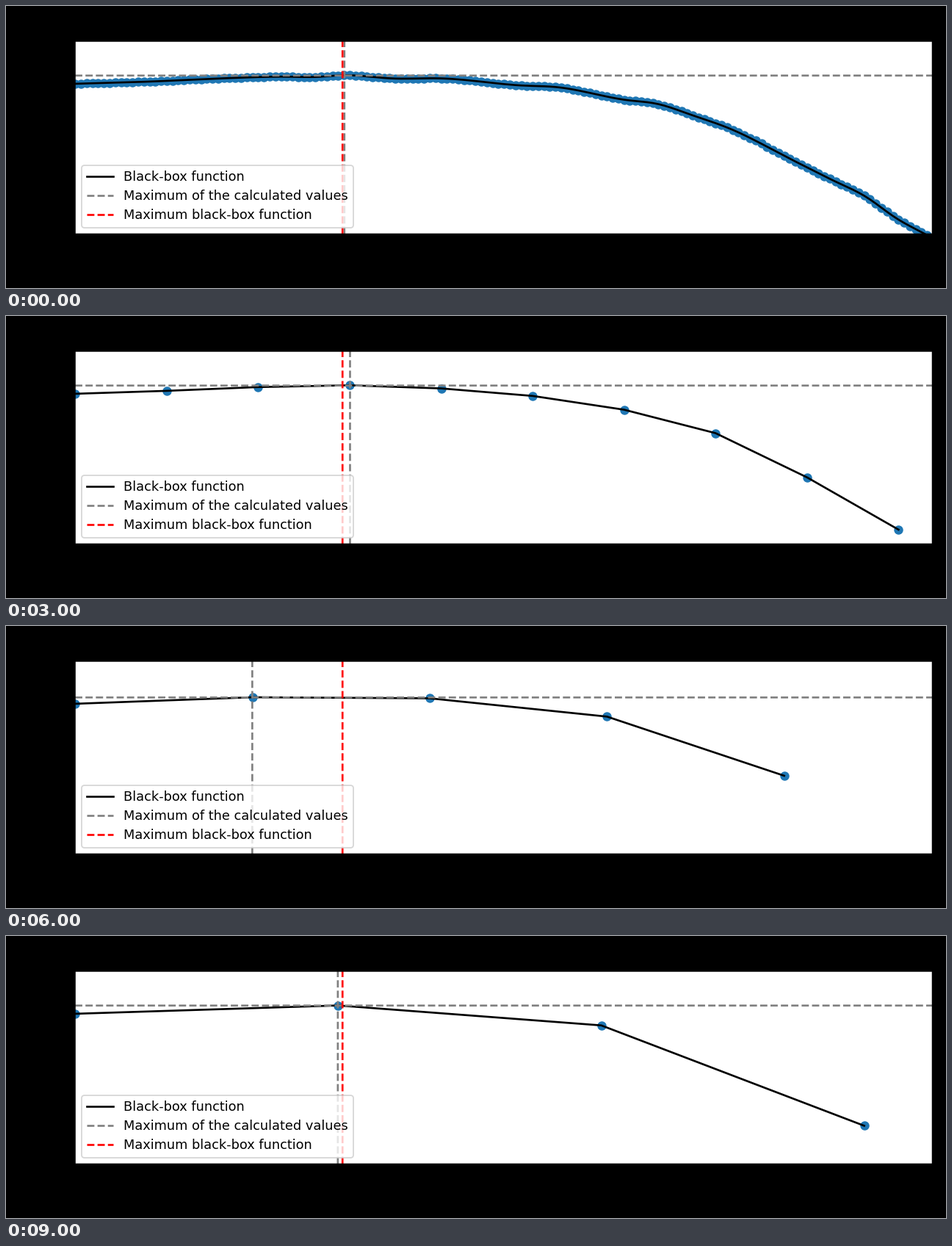
A matplotlib script for the animation above (10000 ms loop, 1280 by 384 pixels).

```python
import numpy as np
import matplotlib.pyplot as plt
from matplotlib.animation import FuncAnimation

WIDTH, HEIGHT, DPI = 1280, 384, 128
GRID = 1.28                      # guide lines sit on this pixel grid
LEFT, RIGHT, TOP, BOTTOM = 73.5 * GRID, 985.5 * GRID, 37.5 * GRID, 242.5 * GRID
X0, SPACING, SAMPLES = 94.3, 7.785, 150
BEST_X = 358 * GRID
FRAMES = 10

plt.rcParams["font.family"] = "DejaVu Sans"

# Bends of the curve as (sample index, stage height measured downwards)
BENDS = [(0, 105.9), (12, 103.2), (26, 98.4), (36, 96.2), (42, 96.6),
         (47, 94.3), (56, 98.8), (64, 98.6), (78, 108.2), (84, 110.3),
         (96, 127.6), (102, 133.6), (108, 148.9), (114, 165.4), (126, 211.9),
         (132, 235.4), (138, 258.4), (144, 290.9), (149, 312)]


def smooth(x, points):
    """Cubic Hermite curve through the points."""
    px, py = np.transpose(points)
    slope = np.gradient(py, px)
    i = np.clip(np.searchsorted(px, x, side="right") - 1, 0, len(px) - 2)
    h = px[i + 1] - px[i]
    t = (x - px[i]) / h
    blend = t * t * (3 - 2 * t)
    return (py[i] * (1 - blend) + py[i + 1] * blend
            + h * t * (1 - t) * (slope[i] * (1 - t) - slope[i + 1] * t))


def on_grid(value):
    return GRID * np.floor(value / GRID + 0.5)


index = np.arange(SAMPLES)
xs = X0 + SPACING * index
ys = smooth(index, BENDS)

fig = plt.figure(figsize=(WIDTH / DPI, HEIGHT / DPI), dpi=DPI, facecolor="black")
ax = fig.add_axes([LEFT / WIDTH, 1 - BOTTOM / HEIGHT,
                   (RIGHT - LEFT) / WIDTH, (BOTTOM - TOP) / HEIGHT])
ax.set(xlim=(LEFT, RIGHT), ylim=(BOTTOM, TOP), xticks=[], yticks=[])
for spine in ax.spines.values():
    spine.set_snap(False)

guide = dict(ls="--", snap=False)
dots = ax.scatter(xs, ys, color="tab:blue")
curve, = ax.plot(xs, ys, color="black", label="Black-box function")
level = ax.axhline(TOP, color="gray", label="Maximum of the calculated values",
                   **guide)
peak = ax.axvline(LEFT, color="gray", **guide)
ax.axvline(BEST_X, color="red", label="Maximum black-box function", **guide)
ax.legend(loc="lower left", labelspacing=0.45)


def update(frame):
    step = 1 + 5 * frame
    x, y = xs[::step], ys[::step]
    top = y.argmin()
    dots.set_offsets(np.column_stack([x, y]))
    curve.set_data(x, y)
    level.set_ydata([on_grid(y[top])] * 2)
    peak.set_xdata([on_grid(x[top])] * 2)
    return dots, curve, level, peak


anim = FuncAnimation(fig, update, frames=FRAMES, interval=1000,
                     repeat=True, repeat_delay=0)
plt.show()
```
